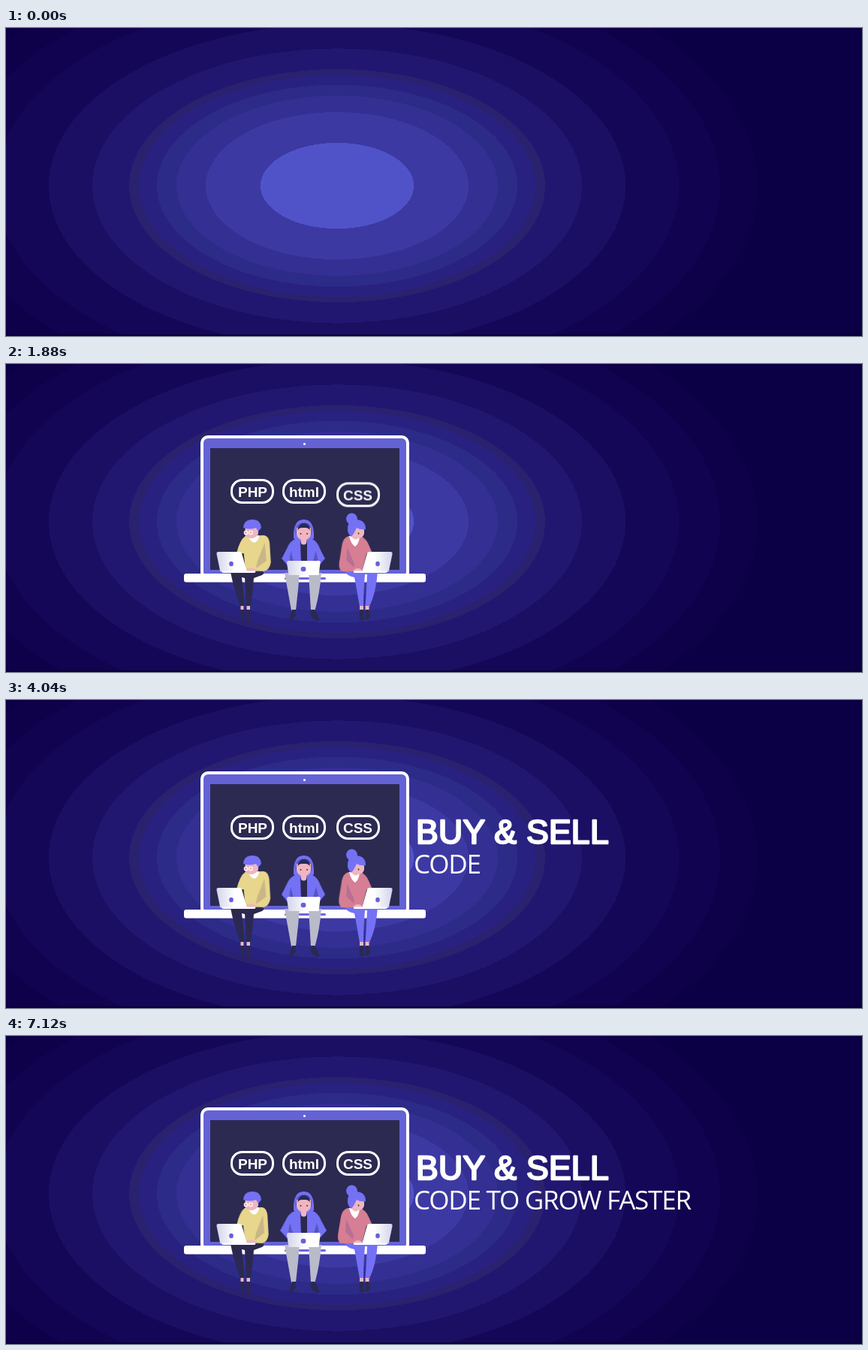
An HTML page without scripts that plays this animation: 1140 px wide and 410 px high, repeating every 7160 ms.

```html
<!DOCTYPE html>
<html lang="en">
<head>
<meta charset="utf-8">
<title>Buy &amp; sell code</title>
<style>
  :root { --loop: 7.16s; }
  html, body { margin: 0; width: 100%; height: 100%; overflow: hidden; background: #0b0045; }
  svg {
    display: block; width: 1140px; height: 410px;
    background: radial-gradient(600px 336px at 441px 210px,
      #5053c8 102px, #3d39a2 0 175px, #342f93 0 214px, #2c2b87 0 240px, #29217f 0 264px, #2a216f 0 277px,
      #211770 0 326px, #1b0f63 0 384px, #150757 0 455px, #11034f 0 510px, #0e014a 0 560px, #0b0045 0);
  }

  /* palette */
  .white { fill: #fff; }
  .violet { fill: #7471f4; }
  .dark { fill: #2b2950; }
  .skin { fill: #efb6bf; }
  .grey { fill: #b9bbc9; }

  .laptop { animation: slide var(--loop) infinite; }
  @keyframes slide {
    0%, .56% { transform: translateX(-565px); animation-timing-function: cubic-bezier(.4, .25, .7, .85); }
    7.26% { transform: translateX(45px); animation-timing-function: ease-in-out; }
    10.06%, 100% { transform: none; }
  }

  /* each pill runs a full loop shifted by its own start; the gate hides what spills over */
  .pills { animation: pill-gate var(--loop) step-end infinite; }
  @keyframes pill-gate { 0% { opacity: 0; } 14% { opacity: 1; } }
  .pill { animation: rise var(--loop) calc(var(--start) - var(--loop)) infinite; }
  @keyframes rise {
    0% { transform: translateY(125px); animation-timing-function: cubic-bezier(.4, .4, .7, .9); }
    4.47% { transform: translateY(-10px); animation-timing-function: ease-in-out; }
    7.82%, 86% { transform: none; }
    86.01%, 100% { transform: translateY(125px); }
  }
  .pill text { font: bold 19px "Liberation Sans", Arial, sans-serif; fill: #fff; text-anchor: middle; }

  .sway {
    transform-box: fill-box; transform-origin: var(--from, 50%) 100%;
    animation: sway calc(var(--loop) / 26) ease-in-out infinite alternate;
  }
  @keyframes sway { to { transform: scaleX(var(--to)); } }

  .offer {
    font: 44.5px "Liberation Sans", Arial, sans-serif; letter-spacing: .3px;
    fill: #fff; stroke: #fff; stroke-width: 2.4; stroke-linejoin: round;
    animation: reveal var(--loop) infinite;
  }
  @keyframes reveal {
    0%, 36.31% { transform: translateX(-310px); animation-timing-function: cubic-bezier(.33, .33, .67, 1); }
    47.1%, 100% { transform: none; }
  }

  .typed {
    font: 35px "Open Sans", "Noto Sans", sans-serif; letter-spacing: -1.25px;
    fill: #fff; white-space: pre;
    animation: type-gate var(--loop) step-end infinite;
  }
  @keyframes type-gate { 0% { opacity: 0; } 49.5% { opacity: 1; } }
  .typed tspan { animation: key var(--loop) calc(3.55s + var(--n) * 85ms - var(--loop)) step-end infinite; }
  @keyframes key { 0% { visibility: visible; } 60% { visibility: hidden; } }
</style>
</head>
<body>
<svg viewBox="0 0 1140 410">
  <defs>
    <clipPath id="screen"><path d="M272 112h252v162h-252z"/></clipPath>
    <clipPath id="beside"><path d="M537 0h603v410h-603z"/></clipPath>
    <linearGradient id="lid">
      <stop offset="0" stop-color="#d3d4ea"/>
      <stop offset=".6" stop-color="#fff"/>
    </linearGradient>
    <g id="notebook">
      <path d="M283 250H311Q313 250 314 252L321 277H288Q286 277 285 275L280.500 253Q280 250 283 250Z" fill="url(#lid)"/>
      <rect x="288" y="275.500" width="44" height="2.500" rx="1.200" class="white"/>
      <ellipse cx="300" cy="266" rx="2.800" ry="3.200" fill="#6461d8"/>
    </g>
    <rect id="capsule" x="300.500" y="154.500" width="55" height="30" rx="14" fill="none" stroke="#fff" stroke-width="3"/>
  </defs>

  <rect y="408" width="1140" height="2" fill="#080038"/>

  <g class="laptop">
    <rect x="261" y="97" width="274" height="188" rx="8" fill="#6562d6" stroke="#fff" stroke-width="4"/>
    <rect x="272" y="112" width="252" height="162" fill="#2c2a51"/>
    <circle cx="397.500" cy="106.500" r="1.600" class="white"/>

    <g clip-path="url(#screen)">
      <g class="pills">
        <g class="pill" style="--start: 1.02s">
          <use href="#capsule"/><text x="328.500" y="176.500">PHP</text>
        </g>
        <g class="pill" style="--start: 1.32s">
          <use href="#capsule" x="69"/><text x="397" y="176.500">html</text>
        </g>
        <g class="pill" style="--start: 1.62s">
          <use href="#capsule" x="141"/><text x="468.500" y="176.500">CSS</text>
        </g>
      </g>
    </g>

    <rect x="237" y="279" width="322" height="11.500" rx="3" class="white"/>

    <!-- left: yellow sweater -->
    <g>
      <path class="dark" d="M299 277L341 275Q346 278 341 281L330 285Q329 304 325.500 323H320.500Q319 302 318 285L314 284Q317 304 317 323H312.500Q303 298 299 277Z"/>
      <path class="skin" d="M312.500 322h4v6h-4zM320.500 322h4.500v6h-4.500z"/>
      <path class="dark" d="M312 327h5l.500 13q-2 3-4 1zM319.500 327h5.500l.500 12q-1 4-5 3z"/>
      <g class="sway" style="--from: 0%; --to: 1.08">
        <path fill="#e8d68c" d="M318 229L341 228Q347 229 348 238L349.500 264Q348 274 341 276L318 275L316 252H307Q311 234 318 229Z"/>
        <path fill="#c9b687" d="M342 238L344 262L331 272L333 262Z"/>
      </g>
      <path class="skin" d="M320 273Q326 269 334 274L332 277H321Z"/>
      <path class="white" d="M322 229L337 228Q337 235 331 238Q325 236 322 229Z"/>
      <path class="skin" d="M319 215H336V226Q332 233 325 232Q318 231 318 225Z"/>
      <path class="violet" d="M316 218Q317 207 328 207Q339 207 340 218L336 223L333 218Q325 221 316 218Z"/>
      <g fill="none" stroke="#fff" stroke-width="1.100">
        <circle cx="319.500" cy="224.500" r="2.300"/><circle cx="326" cy="224.500" r="2.300"/>
      </g>
      <use href="#notebook"/>
    </g>

    <!-- middle: hoodie -->
    <g>
      <rect x="371" y="284" width="55" height="3" rx="1.500" fill="#6a67de"/>
      <path class="grey" d="M371 278H391L389 300L386 328H380Q375 300 371 278ZM403 278H420Q418 304 411.500 328H406Z"/>
      <path class="dark" d="M381 327h5l-.500 9l-6 6q-4 0-2-3zM406 327h5.500l5 11q2 4-2 4l-5-3q-5-3-3.500-12z"/>
      <g class="sway" style="--to: .92">
        <path class="violet" d="M382 234Q396 228 411 234Q417 238 420 246L427 259L418 269H374L365 259L372 246Q376 237 382 234Z"/>
        <path fill="#5654c4" d="M378 249L376 260L381 266H383ZM414 249L417 260L411 266H409Z"/>
      </g>
      <path class="violet" d="M383 232Q382 207 396.500 207Q411 207 410 232L402 239H391Z"/>
      <path class="dark" d="M392 237H401V265H393Z"/>
      <path fill="#5a58cc" d="M386 228Q384 211 396.500 211Q409 211 407 228Z"/>
      <path class="skin" d="M387 218H406V227Q405 232 400 234V239Q396.500 242 393 239V234Q388 232 387 227Z"/>
      <path class="dark" d="M388 221Q390 212 397 212Q404 212 405 221Q401 217 396.500 218Q392 217 388 221Z"/>
      <circle cx="392.500" cy="226" r=".9" class="dark"/>
      <circle cx="401" cy="226" r=".9" class="dark"/>
      <path d="M376 262H417Q419 262 418.500 265L416.500 281H376.500L374 265Q374 262 376 262Z" fill="url(#lid)"/>
      <ellipse cx="396" cy="273" rx="3.400" ry="3.200" fill="#6461d8"/>
    </g>

    <!-- right: red sweater -->
    <g>
      <path class="violet" d="M451 276H495Q493 304 484 323H478.500Q480 302 481 280H478Q476 302 476 323H471Q467 300 464 284Q454 282 451 276Z"/>
      <path class="skin" d="M471 322h5v6h-5zM478.500 322h5v6h-5z"/>
      <path class="dark" d="M471 327h5l1 12q-3 5-6 1zM478.500 327h5l1 9q0 5-6 4z"/>
      <g class="sway" style="--from: 100%; --to: .96">
        <path fill="#d67f94" d="M455 229L472 229Q480 233 483 241L488 252H480L474 276H446Q441 274 442 264L446 240Q448 231 455 229Z"/>
        <path fill="#b86f96" d="M453 244L452 261L462 271L463 266Z"/>
      </g>
      <path class="skin" d="M462 276Q467 269 474 274L473 277Z"/>
      <path class="white" d="M457 229L471 230Q470 239 465 243Q459 239 457 229Z"/>
      <path class="skin" d="M459 216H477V226Q475 232 469 232Q466 236 461 231Z"/>
      <circle cx="460.500" cy="206" r="7.500" class="violet"/>
      <path class="violet" d="M455 222Q454 207 467 207Q479 208 479 220Q472 221 467 218Q464 225 460 230Q456 227 455 222Z"/>
      <circle cx="469.500" cy="225.500" r="1" class="dark"/>
      <use href="#notebook" transform="matrix(-1 0 0 1 795 0)"/>
    </g>
  </g>

  <g clip-path="url(#beside)">
    <text class="offer" x="546" y="190.700">BUY &amp; SELL</text>
  </g>

  <text class="typed" x="543" y="230.500"><tspan style="--n:1">C</tspan><tspan style="--n:2">O</tspan><tspan style="--n:3">D</tspan><tspan style="--n:4">E</tspan> <tspan style="--n:6">T</tspan><tspan style="--n:7">O</tspan> <tspan style="--n:9">G</tspan><tspan style="--n:10">R</tspan><tspan style="--n:11">O</tspan><tspan style="--n:12">W</tspan> <tspan style="--n:14">F</tspan><tspan style="--n:15">A</tspan><tspan style="--n:16">S</tspan><tspan style="--n:17">T</tspan><tspan style="--n:18">E</tspan><tspan style="--n:19">R</tspan></text>
</svg>
</body>
</html>
```
